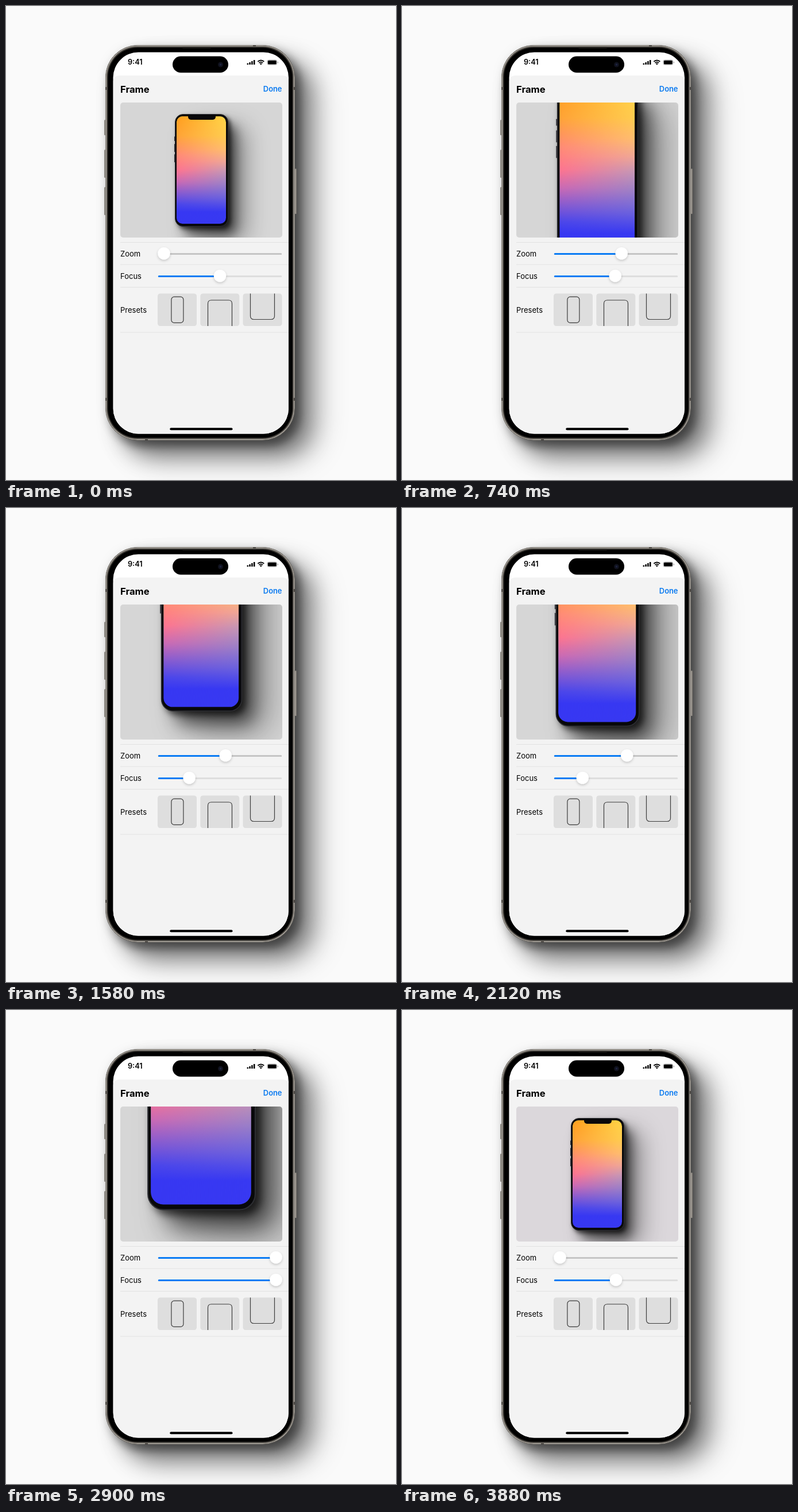
An HTML page for the animation above (3.9 s loop, 679x825 px).

```html
<!DOCTYPE html>
<html lang="en">
<head>
<meta charset="utf-8">
<title>Frame</title>
<style>
html, body { margin: 0; width: 100%; height: 100%; overflow: hidden; background: #fafafa; }
#stage { position: relative; width: 679px; height: 825px; overflow: hidden; background: #fafafa; }
#stage div, #ui { position: absolute; box-sizing: border-box; }
#device {
  left: 173px; top: 68px; width: 330px; height: 688px; border-radius: 56px; background: #000;
  border: 1.5px solid #7d7973;
  box-shadow: inset 0 0 0 1.5px #aaa59d, inset 0 0 0 3.5px #3b3834,
    0 0 22px rgba(0,0,0,.05), 9px 10px 16px rgba(0,0,0,.42),
    26px 26px 38px rgba(0,0,0,.42), 42px 34px 52px rgba(0,0,0,.22);
}
.key { background: linear-gradient(90deg, #8b8680, #a7a29b, #55514c); border-radius: 1.5px; }
#ui { left: 0; top: 0; font-family: Inter, Roboto, sans-serif; }
#preview {
  left: 199px; top: 168px; width: 281.5px; height: 234.5px;
  border-radius: 5px; overflow: hidden; background: #d6d6d6;
}
#mock {
  left: 94.5px; top: 20px; width: 93px; height: 196px; border-radius: 14px;
  background: #08080a; border: .7px solid #2d2e33;
  box-shadow: 4px 4px 7px rgba(0,0,0,.6), 14px 16px 20px -2px rgba(0,0,0,.58),
    30px 24px 40px rgba(0,0,0,.36);
}
.side { left: -2px; width: 1.6px; background: #25262b; border-radius: 1px; }
#wall, #warm { border-radius: 10.5px; }
#wall {
  left: 2.8px; top: 2.7px; width: 86px; height: 187px; overflow: hidden;
  background: linear-gradient(#ffdb4c, #ffd052 18%, #ffc070 31%, #efa898 42%, #c598b6 51%, #9c80c8 63%, #6c62de 76%, #3839f2 89%);
}
#warm {
  inset: 0;
  background: linear-gradient(#ffa01f, #ffa437 18%, #ff8a75 36%, #ff738e 50%, #cd68b2 61%, #8658d0 72%, #4a45ea 82%, #3737f2 89%);
  -webkit-mask-image: linear-gradient(95deg, #000 5%, transparent 95%);
  mask-image: linear-gradient(95deg, #000 5%, transparent 95%);
}
#notch { left: 22px; top: 1.5px; width: 48px; height: 7.7px; border-radius: 0 0 5px 5px; background: #08080a; }
</style>
</head>
<body>
<div id="stage">
  <div class="key" style="left:170.5px;top:198px;width:3.5px;height:27px"></div>
  <div class="key" style="left:170.5px;top:250px;width:3.5px;height:49px"></div>
  <div class="key" style="left:170.5px;top:315px;width:3.5px;height:49px"></div>
  <div id="device"></div>
  <div class="key" style="left:502.5px;top:283px;width:3.5px;height:79px"></div>

  <svg id="ui" width="679" height="825" viewBox="0 0 679 825">
    <defs>
      <clipPath id="screen"><rect x="186.5" y="80.5" width="305.5" height="664" rx="44"/></clipPath>
      <filter id="lift" x="-50%" y="-50%" width="200%" height="200%">
        <feDropShadow dx="0" dy="2" stdDeviation="2.2" flood-opacity=".2"/>
      </filter>
    </defs>
    <g clip-path="url(#screen)">
      <rect x="186" y="80" width="307" height="666" fill="#fff"/>
      <rect x="186.5" y="121" width="306" height="640" rx="10" fill="#f3f3f3"/>
    </g>
    <g fill="#4b4742">
      <rect x="307" y="71.5" width="50" height="2" rx="1" fill="#24221f"/>
      <rect x="430" y="68" width="5" height="2"/><rect x="242" y="754" width="5" height="2"/>
      <rect x="173" y="141" width="2" height="5"/><rect x="501" y="141" width="2" height="5"/>
      <rect x="173" y="682" width="2" height="5"/><rect x="501" y="682" width="2" height="5"/>
    </g>

    <text x="212" y="102" font-size="12.7" font-weight="600">9:41</text>
    <rect x="290" y="87.5" width="97" height="28.5" rx="14.25"/>
    <circle cx="373.5" cy="102" r="4.5" fill="#10121d"/><circle cx="373.5" cy="102" r="1.8" fill="#1d2340"/>
    <path d="M420.8 102v-2.2M424.6 102v-4M428.4 102v-6M432.2 102v-8" stroke="#000" stroke-width="2.5"/>
    <g fill="none" stroke="#000" stroke-width="1.8">
      <path d="M438.3 96.8q5.5-4.6 11 0M440.4 99.1q3.4-2.9 6.8 0"/>
    </g>
    <path d="M443.8 102.4l-2-2q2-1.6 4 0z"/>
    <rect x="454.8" y="93.8" width="17" height="8.6" rx="2.5" fill="none" stroke="#aaa" stroke-width=".8"/>
    <rect x="455.8" y="94.8" width="15" height="6.6" rx="1.5"/>
    <rect x="472.8" y="96.7" width="1.2" height="2.8" rx=".6" fill="#aaa"/>

    <text x="199" y="150.5" font-size="16.6" font-weight="700">Frame</text>
    <text x="480.5" y="149" font-size="12.9" font-weight="600" fill="#0a7af0" text-anchor="end">Done</text>
    <path d="M199 411.5H492M199 450H492M199 489.5H492M199 568H492" stroke="#e2e2e2"/>
    <g font-size="13">
      <text x="199" y="435.5">Zoom</text>
      <text x="199" y="475">Focus</text>
      <text x="199" y="534">Presets</text>
    </g>

    <g id="sliders"></g>

    <g fill="#dedede">
      <rect x="264" y="500.5" width="68" height="56.5" rx="4.5"/>
      <rect x="338.3" y="500.5" width="68" height="56.5" rx="4.5"/>
      <rect x="412.5" y="500.5" width="68" height="56.5" rx="4.5"/>
    </g>
    <g fill="none" stroke="#3c3c3c" stroke-width="1.2">
      <rect class="icon" x="287.9" y="506.2" width="21" height="45.2" rx="5"/>
      <path class="icon" d="M351.5 557V518q0-6 6-6h30q6 0 6 6v39"/>
      <path class="icon" d="M425.5 500.5v39q0 6 6 6h30q6 0 6-6v-39"/>
    </g>
    <rect x="285.3" y="734.2" width="109.2" height="4" rx="2"/>
  </svg>

  <div id="preview">
    <div id="mock">
      <div class="side" style="top:38px;height:8px"></div>
      <div class="side" style="top:51px;height:14px"></div>
      <div class="side" style="top:69px;height:14px"></div>
      <div id="wall"><div id="warm"></div></div>
      <div id="notch"></div>
    </div>
  </div>
</div>

<script>
const LOOP = 3900;
const MIN = 275, SPAN = 195;
const MID = 286, HIGH = 146, LOW = 424;

// [time, value] keys, eased from one to the next
const tracks = {
  zoom: [[0, 0], [680, .55], [2040, .55], [2420, 1], [2980, 1], [3240, 0]],
  focus: [[0, .5], [680, .5], [1300, .226], [2040, .226], [2420, 0], [2660, 0], [2900, 1], [2980, 1], [3240, .5]],
  scale: [[0, 1], [100, 1], [760, 1.52], [2040, 1.52], [2440, 2.03], [2980, 2.03], [3250, 1]],
  y: [[0, MID], [740, MID], [1420, 205], [2040, 205], [2440, LOW], [2660, LOW], [2920, HIGH], [2980, HIGH], [3250, MID]],
  tint: [[0, 0], [3660, 0], [3880, 1]]
};
const taps = [2900, 1860, 2620];

const ease = p => .5 - .5 * Math.cos(Math.PI * p);

function at(keys, t) {
  const i = keys.findIndex(k => k[0] > t);
  if (i < 0) return keys[keys.length - 1][1];
  const [t0, a] = keys[i - 1], [t1, b] = keys[i];
  return a + (b - a) * ease((t - t0) / (t1 - t0));
}

function make(tag, attrs) {
  const el = document.createElementNS("http://www.w3.org/2000/svg", tag);
  for (const k in attrs) el.setAttribute(k, attrs[k]);
  return document.getElementById("sliders").appendChild(el);
}

function slider(y, rest) {
  const bar = { x: 264.8, y: y - 1.5, height: 3, rx: 1.5 };
  make("rect", { ...bar, width: 215.4, fill: rest });
  const fill = make("rect", { ...bar, fill: "#0a7cf4" });
  const knob = make("circle", { cy: y - .8, r: 10.7, fill: "#fff", filter: "url(#lift)" });
  return v => {
    const x = MIN + SPAN * v;
    fill.setAttribute("width", x - 264.8);
    knob.setAttribute("cx", x);
  };
}

const setZoom = slider(431.4, "#c5c5c5");
const setFocus = slider(470.4, "#dedede");
const preview = document.getElementById("preview");
const mock = document.getElementById("mock");
const icons = document.querySelectorAll(".icon");

function draw(t) {
  setZoom(at(tracks.zoom, t));
  setFocus(at(tracks.focus, t));
  mock.style.transform = `translateY(${at(tracks.y, t) - MID}px) scale(${at(tracks.scale, t)})`;
  const k = at(tracks.tint, t);
  preview.style.background = `rgb(${214 + 5 * k},${214 + k},${214 + 5 * k})`;
  icons.forEach((icon, i) => {
    const p = (t - taps[i]) / 200;
    icon.style.opacity = p > 0 && p < 1 ? 1 - .65 * Math.sin(Math.PI * p) : 1;
  });
}

const start = performance.now();
function tick() {
  draw((performance.now() - start) % LOOP);
  requestAnimationFrame(tick);
}
draw(0);
requestAnimationFrame(tick);
</script>
</body>
</html>
```
